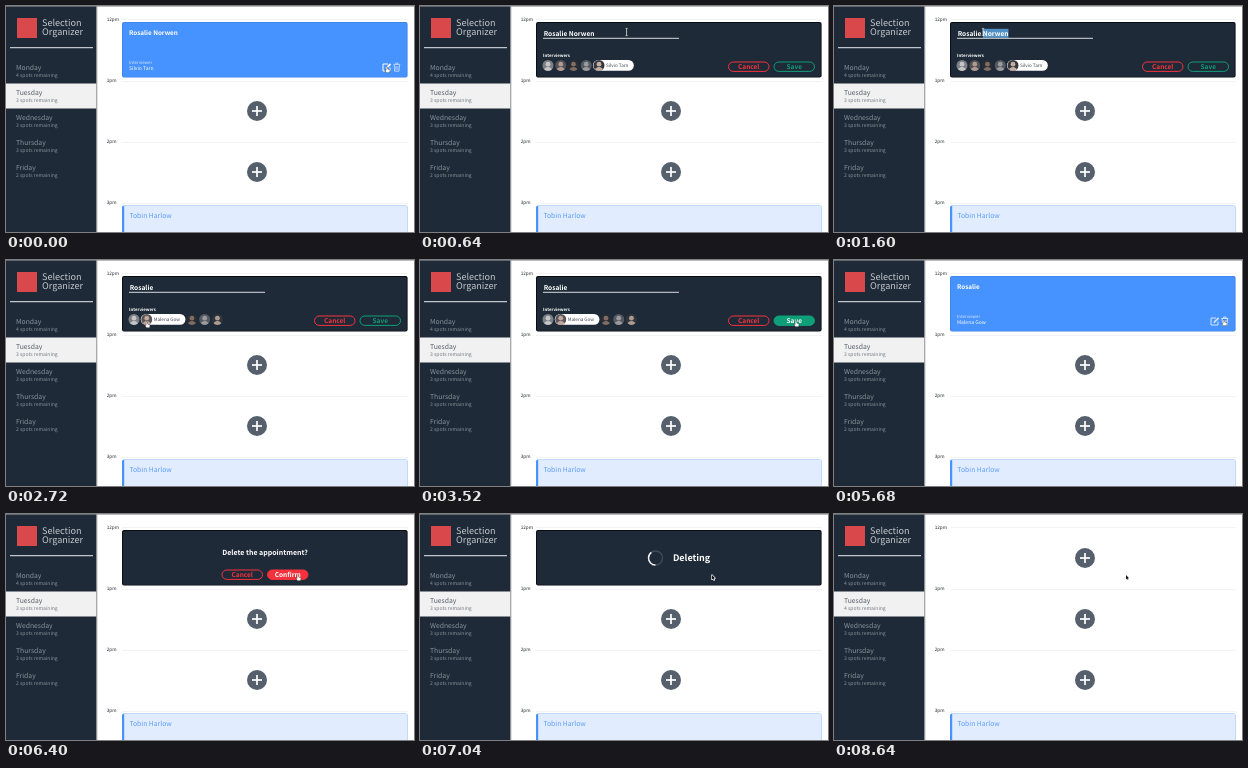
Animation, 408 px wide and 226 px high, one loop 8.72 s. Source, as an HTML page with a canvas:

```html
<!DOCTYPE html>
<html lang="en">
<head>
<meta charset="utf-8">
<title>Selection Organizer</title>
<style>
html, body { margin: 0; width: 100%; height: 100%; overflow: hidden; background: #fff; }
canvas { display: block; width: 408px; height: 226px; }
</style>
</head>
<body>
<canvas id="stage"></canvas>
<script>
const W = 408, H = 226, LOOP = 8720;
const canvas = document.getElementById('stage');
const c = canvas.getContext('2d');
const scale = window.devicePixelRatio || 1;
canvas.width = W * scale;
canvas.height = H * scale;

const FONT = '"Noto Sans CJK JP", "Noto Sans CJK SC", "Noto Sans CJK", "Open Sans", sans-serif';
const DARK = '#1e2a37', BLUE = '#4692ff', RED = '#f5323c', GREEN = '#0f9f78';
const FIRST = 'Rosalie', LAST = 'Norwen';
const PEOPLE = [
  { name: 'Amelie Dorn', bg: '#8d9095', fg: '#d3d2d0' },
  { name: 'Malena Gow', bg: '#59565a', fg: '#c3a79d' },
  { name: 'Edvin Sarle', bg: '#2b2d33', fg: '#8f776c' },
  { name: 'Nora Quill', bg: '#5f636b', fg: '#a9a6a6' },
  { name: 'Silvio Tarn', bg: '#35373d', fg: '#c4aea2' }
];

// Moments, in ms, at which the scene switches
const T = { edit: 80, drag: 960, erase: 1800, pick: 2600, save: 3760, saved: 4960,
            trash: 5920, confirm: 6640, gone: 7680 };

// Pointer stops: time, x, y
const PATH = [
  [0, 381, 61], [80, 381, 61], [400, 226, 28], [540, 222, 26], [800, 176, 26],
  [960, 175, 26], [1440, 149, 26], [1900, 149, 26], [2480, 141, 62], [2800, 141, 62],
  [3520, 376, 61], [3800, 376, 61], [4200, 381, 61], [5280, 381, 61], [5600, 390, 60],
  [5920, 390, 60], [6400, 292, 61], [8720, 292, 61]
];

function pointer(t) {
  let i = 1;
  while (i < PATH.length - 1 && t > PATH[i][0]) i++;
  const [t0, x0, y0] = PATH[i - 1], [t1, x1, y1] = PATH[i];
  const k = Math.min(1, Math.max(0, (t - t0) / (t1 - t0)));
  const e = k * k * (3 - 2 * k);
  return { x: x0 + (x1 - x0) * e, y: y0 + (y1 - y0) * e };
}

function text(str, x, y, size, color, weight = 400, align = 'left') {
  c.font = `${weight} ${size}px ${FONT}`;
  c.textAlign = align;
  c.fillStyle = color;
  c.fillText(str, x, y);
}

function rect(x, y, w, h, color) {
  c.fillStyle = color;
  c.fillRect(x, y, w, h);
}

function round(x, y, w, h, r, color) {
  c.beginPath();
  c.roundRect(x, y, w, h, r);
  c.fillStyle = color;
  c.fill();
}

function arc(x, y, r, from, to, color, width) {
  c.beginPath();
  c.arc(x, y, r, from, to);
  c.strokeStyle = color;
  c.lineWidth = width;
  c.stroke();
}

function disc(x, y, r, color) {
  c.beginPath();
  c.arc(x, y, r, 0, Math.PI * 2);
  c.fillStyle = color;
  c.fill();
}

function line(points, color, width) {
  c.beginPath();
  points.forEach(([x, y]) => c.lineTo(x, y));
  c.strokeStyle = color;
  c.lineWidth = width;
  c.stroke();
}

function inside(p, x, y, w, h) {
  return p.x >= x && p.x <= x + w && p.y >= y && p.y <= y + h;
}

function sidebar(t) {
  rect(0, 0, 90.4, H, DARK);
  rect(11, 12, 20, 20, '#d9484a');
  text('Selection', 36, 20.2, 9.1, '#c3c8ce', 300);
  text('Organizer', 36, 29.3, 9.1, '#c3c8ce', 300);
  rect(4, 41.2, 83, 1, '#e9ebed');

  const days = [['Monday', 4], ['Tuesday', t < T.gone ? 3 : 4], ['Wednesday', 3],
                ['Thursday', 3], ['Friday', 2]];
  days.forEach(([day, spots], i) => {
    const y = 63.8 + i * 25.05, on = i === 1;
    if (on) rect(0, 77.5, 90.4, 25, '#f1f1f1');
    text(day, 10, y, 6.8, on ? '#565d67' : '#8a939e', on ? 400 : 500);
    text(`${spots} spots remaining`, 10, y + 7, 5.06, on ? '#757b83' : '#8a929c');
  });

  const shade = c.createLinearGradient(90.4, 0, 92.5, 0);
  shade.addColorStop(0, 'rgba(0,0,0,.25)');
  shade.addColorStop(1, 'rgba(0,0,0,0)');
  rect(90.4, 0, 2.1, H, shade);
}

function plus(y) {
  disc(251, y, 10, '#56606d');
  line([[246, y], [256, y]], '#fff', 1.7);
  line([[251, y - 5], [251, y + 5]], '#fff', 1.7);
}

function schedule() {
  ['12pm', '1pm', '2pm', '3pm'].forEach((hour, i) => {
    const y = 13.4 + i * 61.1;
    text(hour, 100.7, y + 1.7, 4.65, '#22262d', 500);
    rect(116, Math.round(y), 286, 1, '#f3f3f3');
  });
  plus(105);
  plus(166);
  round(116, 199.6, 285.6, 40, 2, BLUE);
  round(118.2, 199.6, 283.4, 40, [0, 2, 2, 0], '#e1ecff');
  text('Tobin Harlow', 123.4, 212.4, 6.8, '#5c9dfb');
}

function card(fill, edge) {
  round(116, 16, 285.6, 55.6, 2, edge);
  round(116.9, 16.9, 283.8, 53.8, 1.5, fill);
}

function darkCard() {
  card(DARK, '#080b10');
}

function editIcon(color) {
  line([[382, 58], [377, 58], [377, 65], [384, 65], [384, 61.5]], color, 1);
  line([[379.8, 62.6], [384.6, 57.8]], color, 1.7);
}

function trashIcon(color) {
  line([[387.4, 58.4], [394.2, 58.4]], color, 0.8);
  line([[389.5, 58.2], [389.8, 57], [391.8, 57], [392.1, 58.2]], color, 0.7);
  line([[388.2, 59], [388.6, 65.2], [393, 65.2], [393.4, 59]], color, 0.8);
  for (const x of [389.7, 390.8, 391.9]) line([[x, 60], [x, 64]], color, 0.5);
}

function booking(name, host, p) {
  card(BLUE, '#3f86ee');
  text(name, 123, 29.2, 6.35, '#fff', 600);
  text('Interviewer', 123, 57.6, 4.35, 'rgba(255,255,255,.8)');
  text(host, 123, 64.2, 5.06, '#fff', 500);
  const dim = 'rgba(255,255,255,.75)';
  editIcon(p.x < 386 ? '#fff' : dim);
  trashIcon(p.x > 386 ? '#fff' : dim);
}

function button(label, x, color, p) {
  const w = 40.5, y = 56, h = 9.4;
  const hot = inside(p, x, y, w, h);
  round(x, y, w, h, h / 2, hot ? color : DARK);
  c.strokeStyle = color;
  c.lineWidth = 1;
  c.stroke();
  text(label, x + w / 2, 63.1, 6.5, hot ? '#fff' : color, 600, 'center');
}

function avatar(x, person, alpha) {
  const y = 59.4;
  c.save();
  c.globalAlpha = alpha;
  c.beginPath();
  c.arc(x, y, 5.5, 0, Math.PI * 2);
  c.clip();
  rect(x - 6, y - 6, 12, 12, person.bg);
  disc(x, y - 1.2, 2.4, person.fg);
  disc(x, y + 5.8, 4.2, person.fg);
  c.restore();
}

function people(chosen) {
  let x = 122;
  PEOPLE.forEach((person, i) => {
    if (i === chosen) {
      c.font = `400 4.6px ${FONT}`;
      const w = c.measureText(person.name).width + 18.5;
      round(x, 54, w, 10.8, 5.4, '#fff');
      avatar(x + 6, person, 1);
      text(person.name, x + 13, 61.2, 4.6, '#3f454e');
      x += w + 0.5;
    } else {
      avatar(x + 6, person, 0.85);
      x += 12.75;
    }
  });
}

function form(t, p) {
  darkCard();
  c.font = `600 6.6px ${FONT}`;
  const start = 123.7 + c.measureText(FIRST + ' ').width;
  const end = start + c.measureText(LAST).width;
  if (t >= T.drag && t < T.erase) {
    const left = Math.max(start, Math.min(end, p.x));
    rect(left, 22.8, end - left, 9, '#4f8fc4');
  }
  text(t < T.erase ? `${FIRST} ${LAST}` : FIRST, 123.7, 29.9, 6.6, '#fff', 600);
  rect(123, 31.8, 136, 1, '#d5d9de');
  text('Interviewers', 123, 50.5, 4.35, '#fff', 600);
  people(t < T.pick ? 4 : 1);
  button('Cancel', 308.5, RED, p);
  button('Save', 354, GREEN, p);
}

function status(label, x, angle) {
  darkCard();
  arc(x, 44, 7, 0, Math.PI * 2, 'rgba(255,255,255,.16)', 1.3);
  arc(x, 44, 7, angle - Math.PI * 0.8, angle, '#f4f5f6', 1.4);
  text(label, x + 17.4, 47.3, 9, '#fff', 700);
}

function confirmBox(p) {
  darkCard();
  text('Delete the appointment?', 259, 41, 7, '#fff', 600, 'center');
  button('Cancel', 216, RED, p);
  button('Confirm', 261.5, RED, p);
}

function spin(t, anchor, phase) {
  return phase + (t - anchor) / 1000 * Math.PI * 2;
}

function slot(t, p) {
  if (t < T.edit) booking(`${FIRST} ${LAST}`, PEOPLE[4].name, p);
  else if (t < T.save) form(t, p);
  else if (t < T.saved) status('Saving', 239, spin(t, 4400, Math.PI * 0.45));
  else if (t < T.trash) booking(FIRST, PEOPLE[1].name, p);
  else if (t < T.confirm) confirmBox(p);
  else if (t < T.gone) status('Deleting', 235.5, spin(t, 7040, Math.PI * 1.3));
  else plus(44);
}

function shape(x, y, points, fill, edge, width) {
  c.beginPath();
  points.forEach(([dx, dy]) => c.lineTo(x + dx, y + dy));
  c.closePath();
  c.strokeStyle = edge;
  c.lineWidth = width;
  c.stroke();
  c.fillStyle = fill;
  c.fill();
}

function arrow(x, y) {
  shape(x, y, [[0, 0], [0, 4.4], [1.1, 3.6], [1.8, 5.1], [2.4, 4.8], [1.8, 3.3], [3.1, 3.2]],
    '#111', '#fff', 1.3);
}

function hand(x, y) {
  shape(x, y, [[-0.6, 0], [0.4, 0], [0.5, 2.2], [2.8, 2.8], [2.5, 5.6], [-0.6, 5.6],
    [-2, 3.4], [-0.7, 3.5]], '#fff', '#222', 0.8);
}

function beam(x, y) {
  line([[x, y - 3.5], [x, y + 3.5]], '#fff', 0.7);
  for (const end of [-3.6, 3.6]) line([[x - 1.2, y + end], [x + 1.2, y + end]], '#fff', 0.5);
}

function drawPointer(t, p) {
  const editing = t >= T.edit && t < T.save;
  const asking = t >= T.trash && t < T.confirm;
  const icons = t < T.edit || (t >= T.saved && t < T.trash);
  if (editing && inside(p, 123, 18, 136, 14)) beam(p.x, p.y);
  else if (icons ||
           (editing && (inside(p, 122, 54, 95, 11) || inside(p, 308, 56, 87, 10))) ||
           (asking && inside(p, 216, 56, 86, 10))) hand(p.x, p.y);
  else arrow(p.x, p.y);
}

function draw(t) {
  const p = pointer(t);
  c.setTransform(scale, 0, 0, scale, 0, 0);
  c.textRendering = 'geometricPrecision';
  c.lineJoin = 'round';
  rect(0, 0, W, H, '#fff');
  schedule();
  slot(t, p);
  sidebar(t);
  rect(0, 0, W, 0.6, '#8e9298');
  drawPointer(t, p);
}

const begin = performance.now();
function tick() {
  draw((performance.now() - begin) % LOOP);
  requestAnimationFrame(tick);
}
tick();
</script>
</body>
</html>
```
